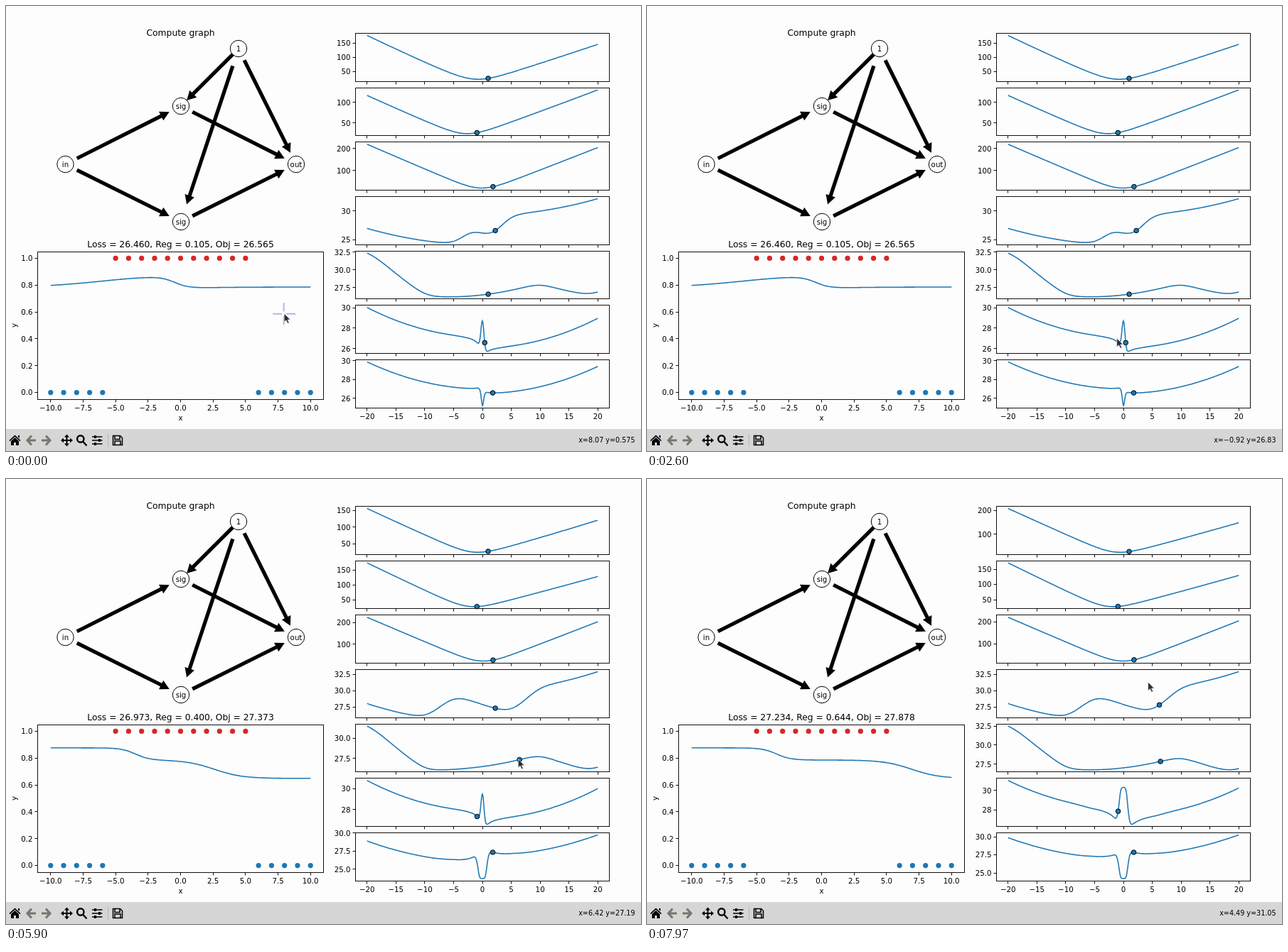
Animation of 893x627 px, one loop 8000 ms. Source, as an HTML page with a canvas:

```html
<!DOCTYPE html>
<html lang="en">
<head>
<meta charset="utf-8">
<title>Compute graph</title>
<style>
  html, body { margin: 0; width: 100%; height: 100%; overflow: hidden; background: #fdfdfd; }
  canvas { display: block; }
</style>
</head>
<body>
<canvas id="stage" width="893" height="627"></canvas>
<script>
const ctx = document.getElementById('stage').getContext('2d');
const LOOP = 8000, BLUE = '#1f77b4', RED = '#d62728', INK = '#000', PAPER = '#fdfdfd';
const FONT = '"DejaVu Sans", sans-serif';
const range = (a, b, n) => Array.from({ length: n }, (_, i) => a + (b - a) * i / (n - 1));

// --- Model: two sigmoid units and a base-2 sigmoid output, cost measured in bits
const sig = v => 1 / (1 + Math.exp(-v));
const logit = ([out1, out2, outBias, bias1, bias2, in1, in2], x) =>
  out1 * sig(in1 * x + bias1) + out2 * sig(in2 * x + bias2) + outBias;
const predict = (w, x) => 1 / (1 + 2 ** -logit(w, x));
const samples = range(-10, 10, 21).map(x => ({ x, y: Math.abs(x) < 5.5 ? 1 : 0 }));
const softplus2 = z => Math.max(z, 0) + Math.log2(1 + 2 ** -Math.abs(z));

function objective(w) {
  let cost = 0.005 / Math.LN2 * w.reduce((sum, v) => sum + v * v, 0);
  for (const { x, y } of samples) {
    const z = logit(w, x);
    cost += softplus2(y ? -z : z);
  }
  return cost;
}

// --- Axes
function makeAxes(left, top, width, height, xlim, ylim, digits) {
  const [x0, x1] = xlim, [y0, y1] = ylim;
  return {
    left, top, width, height, ylim, digits,
    px: x => left + (x - x0) / (x1 - x0) * width,
    py: y => top + (y1 - y) / (y1 - y0) * height,
    dataX: px => x0 + (px - left) / width * (x1 - x0),
    dataY: py => y1 - (py - top) / height * (y1 - y0),
    contains: (px, py) => px >= left && px <= left + width && py >= top && py <= top + height
  };
}

// Largest sensible step for about three intervals that still shows two ticks
function chooseTicks([lo, hi]) {
  const steps = [1, 2, 2.5, 5, 10, 20, 25, 50, 100, 200, 250];
  let i = steps.findIndex(s => s >= (hi - lo) / 3);
  for (; i >= 0; i--) {
    const step = steps[i], ticks = [];
    for (let v = Math.ceil(lo / step) * step; v <= hi; v += step) ticks.push(v);
    if (ticks.length > 1 || !i) return { ticks, digits: step === 2.5 ? 1 : 0 };
  }
}

const fitAxes = makeAxes(44.5, 346, 402, 208, [-11, 11], [-0.05, 1.05], 3);
const sweep = range(-20, 20, 401);

function makeState(start, weights, title) {
  const plots = weights.map((value, i) => {
    const at = v => objective(weights.map((w, j) => j === i ? v : w));
    const ys = sweep.map(at);
    const lo = Math.min(...ys), hi = Math.max(...ys), pad = (hi - lo) * 0.05;
    const axes = makeAxes(491.5, 38.4 + 76.65 * i, 357, 67.9, [-22, 22], [lo - pad, hi + pad], 2);
    return { axes, ys, value, cost: at(value), ...chooseTicks(axes.ylim) };
  });
  return { start, weights, title, plots };
}

const base = [0.99, -0.95, 1.835, 2.23, 1, 0.398, 1.79];
const withWeights = changes => Object.assign([...base], changes);
const states = [
  makeState(0, base, 'Loss = 26.460, Reg = 0.105, Obj = 26.565'),
  makeState(2800, withWeights({ 5: -0.92 }), 'Loss = 26.476, Reg = 0.110, Obj = 26.586'),
  makeState(5000, withWeights({ 5: -0.92, 4: 6.42 }), 'Loss = 26.973, Reg = 0.400, Obj = 27.373'),
  makeState(7000, withWeights({ 5: -0.92, 4: 6.42, 3: 6.23 }), 'Loss = 27.234, Reg = 0.644, Obj = 27.878')
];
const stateAt = t => states.findLast(s => s.start <= t);

// --- Pointer path: time, plot (-1 is the fit), x and y in that plot
const path = [
  [0, -1, 8.07, 0.575], [300, -1, 8.07, 0.575], [1370, 5, -1.83, 26.42],
  [2450, 5, -0.92, 26.83], [3800, 5, -0.92, 26.83], [4550, 4, 6.42, 27.19],
  [5900, 4, 6.42, 27.19], [6650, 3, 6.23, 27.54], [7200, 3, 6.23, 27.54], [7970, 3, 4.49, 31.05]
].map(([t, plot, x, y]) => {
  const axes = plot < 0 ? fitAxes : stateAt(t).plots[plot].axes;
  return { t, x: axes.px(x), y: axes.py(y) };
});

function pointerAt(t) {
  const i = path.findIndex(p => p.t > t);
  if (i < 0) return path[path.length - 1];
  const a = path[i - 1], b = path[i];
  const u = (t - a.t) / (b.t - a.t), k = u * u * (3 - 2 * u);
  return { x: a.x + (b.x - a.x) * k, y: a.y + (b.y - a.y) * k };
}

// --- Drawing helpers
function text(str, x, y, size = 10.25, align = 'center') {
  ctx.font = `${size}px ${FONT}`;
  ctx.textAlign = align;
  ctx.fillStyle = INK;
  ctx.fillText(str, x, y);
}
const num = (v, digits) => v.toFixed(digits).replace('-', '−');

function line(points, color, width) {
  ctx.beginPath();
  for (const [x, y] of points) ctx.lineTo(x, y);
  ctx.strokeStyle = color;
  ctx.lineWidth = width;
  ctx.stroke();
}
function dot(x, y, r, fill, edge) {
  ctx.beginPath();
  ctx.arc(x, y, r, 0, 7);
  ctx.fillStyle = fill;
  ctx.fill();
  if (edge) { ctx.strokeStyle = edge; ctx.lineWidth = 1; ctx.stroke(); }
}
function shape(d, fill, stroke, width = 1) {
  const p = new Path2D(d);
  if (fill) { ctx.fillStyle = fill; ctx.fill(p); }
  if (stroke) { ctx.strokeStyle = stroke; ctx.lineWidth = width; ctx.stroke(p); }
}
const snap = v => Math.floor(v) + 0.5;

function frame(axes, xTicks, xDigits, yTicks, yDigits, showX) {
  const l = snap(axes.left), t = snap(axes.top);
  const r = snap(axes.left + axes.width), b = snap(axes.top + axes.height);
  ctx.strokeStyle = '#111';
  ctx.lineWidth = 1;
  ctx.strokeRect(l, t, r - l, b - t);
  for (const v of xTicks) {
    const x = snap(axes.px(v));
    line([[x, b], [x, b + 4]], '#111', 1);
    if (showX) text(num(v, xDigits), axes.px(v), b + 15.5);
  }
  for (const v of yTicks) {
    const y = snap(axes.py(v));
    line([[l - 4, y], [l, y]], '#111', 1);
    text(num(v, yDigits), l - 7, axes.py(v) + 3.9, 10.25, 'right');
  }
}

// --- Parts of the picture
const nodes = {
  in: [83.5, 223, 'in'], top: [246, 141, 'sig'], low: [246, 304, 'sig'],
  one: [327, 60, '1'], out: [408, 223, 'out']
};
const edges = ['in top', 'in low', 'one top', 'one low', 'one out', 'top out', 'low out'];

function drawGraph() {
  text('Compute graph', 245.5, 42, 12.3);
  for (const edge of edges) {
    const [a, b] = edge.split(' ').map(k => nodes[k]);
    const dx = b[0] - a[0], dy = b[1] - a[1], length = Math.hypot(dx, dy) * 0.8;
    ctx.save();
    ctx.translate(a[0] + dx * 0.1, a[1] + dy * 0.1);
    ctx.rotate(Math.atan2(dy, dx));
    ctx.fillStyle = INK;
    ctx.fillRect(0, -2.6, length - 12, 5.2);
    shape(`M${length} 0l-13 -7v14z`, INK);
    ctx.restore();
  }
  for (const [x, y, label] of Object.values(nodes)) {
    dot(x, y, 11.7, '#fff', INK);
    text(label, x, y + 3.5);
  }
}

function drawFit(state) {
  text(state.title, 245.5, 340, 12.3);
  frame(fitAxes, range(-10, 10, 9), 1, range(0, 1, 6), 1, true);
  text('x', 245.5, 584);
  ctx.save();
  ctx.translate(14.5, 450);
  ctx.rotate(-Math.PI / 2);
  text('y', 0, 0);
  ctx.restore();
  line(range(-10, 10, 201).map(x => [fitAxes.px(x), fitAxes.py(predict(state.weights, x))]), BLUE, 1.55);
  for (const { x, y } of samples) dot(fitAxes.px(x), fitAxes.py(y), 3.6, y ? RED : BLUE);
}

function drawSweeps(state) {
  state.plots.forEach(({ axes, ys, value, cost, ticks, digits }, i) => {
    line(ys.map((y, j) => [axes.px(sweep[j]), axes.py(y)]), BLUE, 1.55);
    frame(axes, range(-20, 20, 9), 0, ticks, digits, i === 6);
    dot(axes.px(value), axes.py(cost), 3.3, BLUE, INK);
  });
}

function drawToolbar(state, mouse) {
  const faded = '#77776a';
  ctx.fillStyle = '#d6d6d6';
  ctx.fillRect(0, 596, 893, 31);
  shape('M12.5 604.5l8 7.5-1 1.2-7-6.4-7 6.4-1-1.2zM17 605h2v4l-2-2zM7 613l5.5-5 5.5 5v6h-4v-4h-3v4h-4z', INK);
  shape('M36 605.5l-6 6.5 6 6.5M31 612h11', null, faded, 3);
  shape('M56 605.5l6 6.5-6 6.5M61 612h-11', null, faded, 3);
  shape('M85.5 606v12M79.5 612h12', null, INK, 2);
  shape('M85.5 603.5l3.5 4h-7zM85.5 620.5l3.5-4h-7zM77 612l4-3.5v7zM94 612l-4-3.5v7z', INK);
  shape('M109.5 610a4.7 4.7 0 1 1-9.4 0a4.7 4.7 0 1 1 9.4 0M108.5 614l5 5.5', null, INK, 2.4);
  shape('M121 607h14.5M121 612h14.5M121 617h14.5', null, INK, 1.5);
  shape('M124 605h3v4h-3zM130 610h3v4h-3zM124 615h3v4h-3z', INK);
  shape('M143.5 603v18', null, '#b4b4b4');
  shape('M150.5 605.5h10l3 3v10h-13zM153 606v4.5h7v-4.5M153 618v-5h8v5', null, INK, 1.5);

  const axes = [fitAxes, ...state.plots.map(p => p.axes)].find(a => a.contains(mouse.x, mouse.y));
  if (!axes) return;
  const x = num(axes.dataX(mouse.x), 2), y = num(axes.dataY(mouse.y), axes.digits);
  text(`x=${x} y=${y}`, 884.5, 614.5, 9.6, 'right');
}

function drawPointer(t, { x, y }) {
  ctx.save();
  ctx.translate(x - 1.8, y - 2.5);
  if (t < 200) shape('M-16 .5h13M3 .5h13M-.5 -15v12M-.5 4v12', null, '#b9b0f2', 2);
  shape('M0 0v12l2.8-2.5 2.2 4.5 2-1-2.1-4.3h3.8z', '#2b2b2b', '#eee', 0.7);
  ctx.restore();
}

function draw(t) {
  const state = stateAt(t), mouse = pointerAt(t);
  ctx.fillStyle = PAPER;
  ctx.fillRect(0, 0, 893, 627);
  drawGraph();
  drawFit(state);
  drawSweeps(state);
  drawToolbar(state, mouse);
  drawPointer(t, mouse);
}

const begin = performance.now();
function tick() {
  draw((performance.now() - begin) % LOOP);
  requestAnimationFrame(tick);
}
tick();
</script>
</body>
</html>
```
